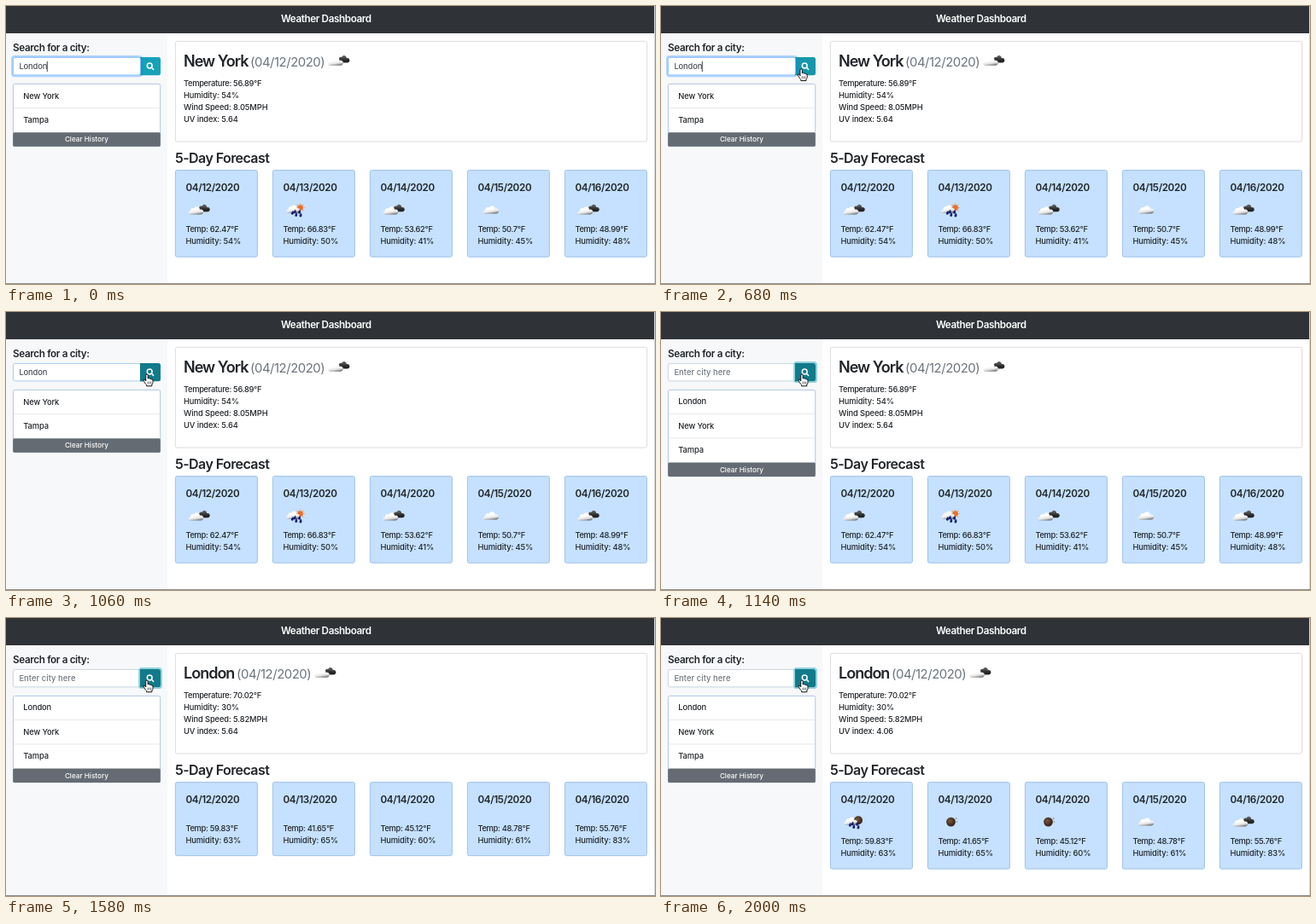
An HTML page for the animation above (4 s loop, 760 by 326 pixels).

```html
<!DOCTYPE html>
<html lang="en">
<head>
<meta charset="utf-8">
<title>Weather Dashboard</title>
<style>
  html, body { margin: 0; width: 100%; height: 100%; overflow: hidden; background: #fff; }
  svg { display: block; width: 760px; height: 326px; }
  text { font-family: Inter, Roboto, sans-serif; font-size: 9.33px; font-weight: 450; fill: #212529; letter-spacing: -.12px; white-space: pre; }
  .title { font-size: 11.67px; font-weight: 600; fill: #fff; letter-spacing: -.38px; text-anchor: middle; }
  .label { font-size: 11.67px; font-weight: 600; letter-spacing: -.34px; }
  .city { font-size: 18px; font-weight: 600; letter-spacing: -1px; }
  .date { font-size: 14.9px; font-weight: 400; fill: #6c757d; letter-spacing: -.45px; }
  .head { font-size: 16px; font-weight: 600; letter-spacing: -.58px; }
  .day { font-size: 11.67px; font-weight: 600; letter-spacing: -.34px; }
  .deg { letter-spacing: -.32px; }
  .typed { fill: #495057; }
  .hint { fill: #6c757d; letter-spacing: .08px; }
  .clear { font-size: 8.17px; font-weight: 500; fill: #fff; letter-spacing: 0; text-anchor: middle; }
</style>
</head>
<body>
<svg id="stage" viewBox="0 0 760 326" xmlns="http://www.w3.org/2000/svg"></svg>
<script>
const LOOP = 4000;
const CLEAR = 1120, CITY = 1380, ICON = 1400, FORECAST = 1580, UV = 1680, LOADED = 1980;

const text = (x, y, s, cls = '', id = '') =>
  `<text x="${x}" y="${y}" class="${cls}" id="${id}">${s}</text>`;
const rect = (x, y, w, h, fill, more = '') =>
  `<rect x="${x}" y="${y}" width="${w}" height="${h}" fill="${fill}" ${more}/>`;
const use = (name, x, y, id = '') =>
  `<use href="#${name}" id="${id}" transform="translate(${x} ${y})"/>`;

const dates = ['04/12/2020', '04/13/2020', '04/14/2020', '04/15/2020', '04/16/2020'];
const cities = {
  before: {
    name: 'New York', dateX: 286, iconX: 389.6, temp: '56.89', hum: 54, wind: '8.05',
    days: [['62.47', 54, 'broken'], ['66.83', 50, 'sunRain'], ['53.62', 41, 'broken'],
           ['50.7', 45, 'cloud'], ['48.99', 48, 'broken']]
  },
  after: {
    name: 'London', dateX: 270, iconX: 373.6, temp: '70.02', hum: 30, wind: '5.82',
    days: [['59.83', 63, 'moonRain'], ['41.65', 65, 'moon'], ['45.12', 60, 'moon'],
           ['48.78', 61, 'cloud'], ['55.76', 83, 'broken']]
  }
};

const cloudPath = 'M-6.5 5C-10 5-10 1.2-6.8.8C-6.8-2-4-3.2-2.2-2.2C-.5-6 5-4.6 4.8-.8C8-1.8 10 1 9 3Q8.3 5 6 5Z';
const drops = [[-5, 4], [-.6, 6.2], [3.2, 3], [-2.2, 2.6], [4.6, 6.6]]
  .map(([x, y]) => `<path d="M${x + 1.2} ${y - 2.8}Q${x + 3} ${y + 2.2} ${x} ${y + 2.2}Q${x - 2.8} ${y + 1.2} ${x + 1.2} ${y - 2.8}Z" fill="#141c6e"/>`).join('');
const rays = Array.from({ length: 8 }, (_, i) =>
  `<path d="M0-3.6V-5.4" transform="translate(4.6 -2) rotate(${i * 45})" stroke="#f2a45b" stroke-width="1.1"/>`).join('');
const smallCloud = `<path d="${cloudPath}" fill="url(#white)" transform="translate(-3.8 -.8) scale(.84 .98)"/>`;

const defs = `<defs>
  <linearGradient id="white" x1=".35" x2=".65" y2="1">
    <stop offset=".4" stop-color="#fff"/><stop offset=".72" stop-color="#e4e4e4"/><stop offset="1" stop-color="#6e6e6e"/>
  </linearGradient>
  <linearGradient id="dark" x2="0" y2="1">
    <stop stop-color="#6b6b6b"/><stop offset=".7" stop-color="#242424"/>
  </linearGradient>
  <radialGradient id="brown" cx=".4" cy=".4">
    <stop stop-color="#79573f"/><stop offset="1" stop-color="#3d271b"/>
  </radialGradient>
  <g id="cloud"><path d="${cloudPath}" fill="url(#white)"/></g>
  <g id="broken">
    <path d="${cloudPath}" fill="url(#dark)" transform="translate(5.4 -1.8) scale(.8 .9)"/>
    <path d="${cloudPath}" fill="url(#white)" transform="translate(-3.6 1) scale(.96 1)"/>
  </g>
  <g id="sunRain">${rays}<circle cx="4.6" cy="-2" r="3.3" fill="#e8702c"/>${smallCloud}${drops}</g>
  <g id="moonRain"><circle cx="5" cy="-1.4" r="5" fill="url(#brown)"/>${smallCloud}${drops}</g>
  <g id="moon">
    <circle cx="-.5" cy=".5" r="5.4" fill="url(#brown)"/>
    <circle cx="5.8" cy="-3.6" r=".8" fill="#8b6a52"/><circle cx="6.5" cy=".3" r=".6" fill="#8b6a52"/>
  </g>
</defs>`;

const mainCard = (id, c) => `<g id="${id}">
  ${text(208, 70.8, c.name, 'city')}${text(c.dateX, 70.8, '(04/12/2020)', 'date')}
  ${text(208, 94.4, `Temperature: ${c.temp}°F`, 'deg')}
  ${text(208, 108.4, `Humidity: ${c.hum}%`)}
  ${text(208, 122.4, `Wind Speed: ${c.wind}MPH`)}</g>`;

const dayLines = c => c.days.map(([temp, hum], i) => {
  const x = 210.4 + i * 114;
  return text(x, 264.5, `Temp: ${temp}°F`, 'deg') + text(x, 278.5, `Humidity: ${hum}%`);
}).join('');
const dayIcons = c => c.days.map((d, i) => use(d[2], 226 + i * 114, 238.6)).join('');

const stage = document.getElementById('stage');
stage.innerHTML = defs +
  rect(0, 0, 760, 326, '#fff') + rect(0, 31, 189, 295, '#f7f8fa') +
  rect(0, 0, 760, 32, '#2f3338') +
  text(374.8, 19, 'Weather Dashboard', 'title') +
  text(8, 52.5, 'Search for a city:', 'label') +

  // search field and button
  `<path id="button" d="M157 60H178.5Q181 60 181 62.5V78.7Q181 81.2 178.5 81.2H157Z"/>
   <rect id="inputRing" fill="none" stroke="#007bff"/>` +
  rect(8.4, 60.4, 149, 20.5, '#fff', 'id="input" rx="2" stroke-width=".9"') +
  `<rect id="buttonRing" fill="none" stroke="#3ab0c3"/>
   <path id="cover" d="M157 60H162V81.2H157Z"/>
   <g fill="none" stroke="#fff" stroke-width="1.5" stroke-linecap="round">
     <circle cx="168.2" cy="70" r="2.9"/><path d="M170.5 72.3L172.6 74.4"/></g>` +
  text(15.4, 74.4, 'London', 'typed', 'typed') + text(15.4, 74.4, 'Enter city here', 'hint', 'hint') +
  rect(47.8, 65, .8, 12, '#111', 'id="caret"') +

  // history
  `<rect id="list" x="8.4" y="91.4" width="172.3" rx="2" fill="#fff" stroke="#a9c1e0" stroke-width=".9"/>
   <g id="newItem">${text(20.3, 108.4, 'London')}${rect(8.8, 119.3, 171.6, .7, '#dcdfe3')}</g>
   <g id="oldItems">${text(20.3, 108.5, 'New York')}${rect(8.8, 119.4, 171.6, .7, '#dcdfe3')}
     ${text(20.3, 137, 'Tampa')}
     ${rect(8.2, 148.3, 172.6, 16.4, '#646b73', 'rx="1.5"')}${text(94.4, 159.4, 'Clear History', 'clear')}</g>` +

  // current weather
  rect(198.4, 41.4, 552.2, 117.6, '#fff', 'rx="2" stroke="#d8d9da" stroke-width=".9"') +
  mainCard('cityBefore', cities.before) + mainCard('cityAfter', cities.after) +
  text(208, 136.4, '', '', 'uv') +
  use('broken', 390, 64, 'mainIcon') +

  // forecast
  text(198, 184.4, '5-Day Forecast', 'head') +
  dates.map((d, i) =>
    `<rect class="card" x="${198.4 + i * 114}" y="192.6" width="96" rx="2" fill="#c5e1ff" stroke="#98bde6" stroke-width=".9"/>` +
    text(210.4 + i * 114, 216.6, d, 'day')).join('') +
  `<g id="linesBefore">${dayLines(cities.before)}</g><g id="linesAfter">${dayLines(cities.after)}</g>
   <g id="iconsBefore">${dayIcons(cities.before)}</g><g id="iconsAfter">${dayIcons(cities.after)}</g>` +

  rect(759, 0, 1, 326, '#d8d8d8') + rect(0, 325, 760, 1, '#8c8c8c') +

  // pointers
  `<g id="beam" fill="none" stroke-linecap="round">
     <path d="M-2.5-6Q0-6 0-4V4Q0 6-2.5 6M2.5-6Q0-6 0-4V4Q0 6 2.5 6M-1.3 1.8H1.3" stroke="#fff" stroke-width="2.2"/>
     <path d="M-2.5-6Q0-6 0-4V4Q0 6-2.5 6M2.5-6Q0-6 0-4V4Q0 6 2.5 6M-1.3 1.8H1.3" stroke="#111" stroke-width="1.1"/></g>
   <g id="hand" stroke="#111" stroke-width="1" stroke-linejoin="round">
     <path fill="#fff" d="M-1.3 7.6V.9Q-1.2-.4 0-.4T1.2.9V4.6Q2.6 3.5 3.4 5Q4.8 4.2 5.4 5.6Q7 5.2 7 7V9Q7 10.6 5.8 11.6V13.4H-.4V12Q-1.8 11-2.6 9.2L-4 7Q-4.4 5.6-3 5.8Q-2.2 6.1-1.3 7.6Z"/>
     <path fill="none" stroke-width=".6" d="M1 8.2V11M2.8 8.2V11M4.6 8.2V11"/></g>`;

const el = {};
stage.querySelectorAll('[id]').forEach(n => { if (n.id) el[n.id] = n; });
const cards = stage.querySelectorAll('.card');

const show = (id, on) => el[id].setAttribute('visibility', on ? 'visible' : 'hidden');
const move = (id, x, y) => el[id].setAttribute('transform', `translate(${x} ${y})`);
const set = (id, attrs) => { for (const k in attrs) el[id].setAttribute(k, attrs[k]); };
const ease = (t, a, b) => {
  const p = Math.min(1, Math.max(0, (t - a) / (b - a)));
  return p * p * (3 - 2 * p);
};
const mix = (a, b, p) => `rgb(${a.map((v, i) => Math.round(v + (b[i] - v) * p))})`;

const path = [[260, 95, 72], [460, 101, 71], [560, 129, 72], [640, 159, 75], [680, 165.8, 75.4], [760, 166.6, 74.6]];
function pointer(t) {
  const last = path[path.length - 1];
  if (t >= last[0]) return last.slice(1);
  const i = Math.max(1, path.findIndex(k => k[0] > t));
  const [a, b] = [path[i - 1], path[i]];
  const p = Math.max(0, (t - a[0]) / (b[0] - a[0]));
  return [a[1] + (b[1] - a[1]) * p, a[2] + (b[2] - a[2]) * p];
}

// Ring that grows outward from a box by the given amount
function ring(id, x, y, w, h, amount, alpha) {
  const s = 1.9 * amount;
  set(id, { x: x - s / 2, y: y - s / 2, width: w + s, height: h + s, rx: 2 + s / 2,
            'stroke-width': s, 'stroke-opacity': alpha * amount });
}

function draw(t) {
  const cleared = t >= CLEAR;
  const city = t >= CITY, forecast = t >= FORECAST, loaded = t >= LOADED;

  const hover = mix([23, 162, 184], [19, 132, 150], ease(t, 620, 760));
  const fill = t < 980 ? hover : mix([19, 132, 150], [17, 122, 139], ease(t, 980, 1040));
  set('button', { fill });
  set('cover', { fill });
  show('cover', t >= 1040);
  set('input', { stroke: mix([128, 189, 255], [198, 208, 220], ease(t, 980, 1140)) });
  ring('inputRing', 8, 60, 149.8, 21.3, 1 - ease(t, 980, 1070), .3);
  ring('buttonRing', 157, 60, 24, 21.2, ease(t, 1045, 1140), .55);

  show('typed', !cleared);
  show('hint', cleared);
  show('caret', t < 240 || (t >= 660 && t < 980));

  const shift = cleared ? 28.2 : 0;
  set('list', { height: 73.2 + shift });
  show('newItem', cleared);
  move('oldItems', 0, shift);

  show('cityBefore', !city);
  show('cityAfter', city);
  show('mainIcon', t < CITY || t >= ICON);
  move('mainIcon', (city ? cities.after : cities.before).iconX, 63.8);
  el.uv.textContent = 'UV index: ' + (t >= UV ? '4.06' : '5.64');

  const short = forecast && !loaded;
  cards.forEach(c => c.setAttribute('height', short ? 86.1 : 101.6));
  show('linesBefore', !forecast);
  show('linesAfter', forecast);
  move('linesAfter', 0, short ? -14.6 : 0);
  show('iconsBefore', !forecast);
  show('iconsAfter', loaded);

  const [x, y] = pointer(t);
  const onButton = x > 157;
  show('beam', t >= 260 && !onButton);
  show('hand', onButton);
  move('beam', x, y);
  move('hand', x - 1.6, y - 1.2);
}

const start = performance.now();
function tick() {
  draw((performance.now() - start) % LOOP);
  requestAnimationFrame(tick);
}
tick();
</script>
</body>
</html>
```
